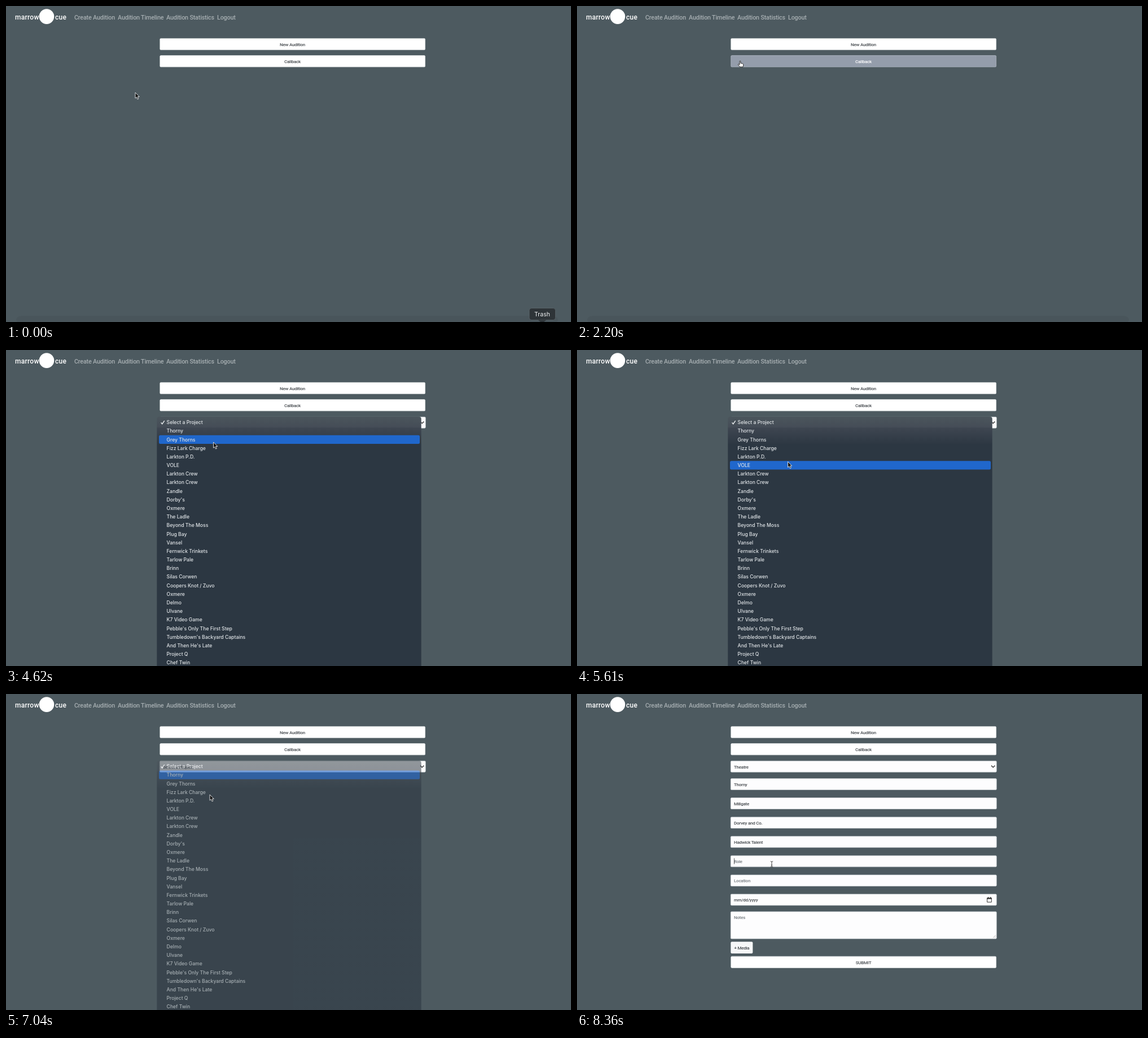
An HTML page for the animation above (8470 ms loop, 1001x559 px).

```html
<!DOCTYPE html>
<html lang="en">
<head>
<meta charset="utf-8">
<title>Create Audition</title>
<style>
  html, body { margin: 0; width: 100%; height: 100%; overflow: hidden; background: #4d5a60; }
  svg { display: block; width: 100%; height: 100%; }
  text { font: 500 8px Roboto, sans-serif; letter-spacing: -.25px; fill: #454a4e; }
  .mid { text-anchor: middle; }
  .hint { fill: #777d82; }
  .brand { font-size: 12px; letter-spacing: .3px; fill: #fff; }
  .nav { font-size: 10.8px; letter-spacing: -.2px; fill: #a6aeb1; }
  .item { font: 500 8.6px Inter, sans-serif; letter-spacing: 0; fill: #e2e6e9; }
  .tip { font: 400 10.5px Inter, sans-serif; letter-spacing: 0; fill: #f0f2f3; }
  .field { fill: #fdfdfe; stroke: #c3cacf; stroke-width: .7; }
</style>
</head>
<body>
<svg id="stage" viewBox="0 0 1001 559" preserveAspectRatio="none">
  <defs>
    <linearGradient id="shade" gradientUnits="userSpaceOnUse" x1="0" y1="118" x2="0" y2="168">
      <stop offset="0" stop-color="#4b555c"/>
      <stop offset=".36" stop-color="#454d57"/>
      <stop offset=".4" stop-color="#3e4651"/>
      <stop offset="1" stop-color="#2c3742"/>
    </linearGradient>
  </defs>
</svg>
<script>
const LOOP = 8470, STEP = 110;
const ROW = 15.18, MENU_TOP = 120.4;
const projects = [
  "Select a Project", "Thorny", "Grey Thorns", "Fizz Lark Charge", "Larkton P.D.", "VOLE",
  "Larkton Crew", "Larkton Crew", "Zandle", "Dorby's", "Oxmere", "The Ladle",
  "Beyond The Moss", "Plug Bay", "Vansel", "Fernwick Trinkets", "Tarlow Pale", "Brinn",
  "Silas Corwen", "Coopers Knot / Zuvo", "Oxmere", "Delmo", "Ulvane", "K7 Video Game",
  "Pebble's Only The First Step", "Tumbledown's Backyard Captains", "And Then He's Late",
  "Project Q", "Chef Twin"
];

// Pointer path: time, x, y
const path = [
  [0, 229, 153], [220, 229, 153], [880, 286, 93], [1760, 287, 96], [2200, 289, 97],
  [2640, 289, 97], [3300, 338.5, 125.5], [4070, 338.5, 125.5], [4620, 367.5, 163],
  [5060, 371, 184], [5610, 373.5, 197.5], [5940, 373.5, 197.5], [6600, 364, 145],
  [6820, 363, 146], [7040, 361, 178], [7700, 345, 301], [LOOP, 345, 301]
];

const text = (x, y, str, cls = "") => `<text x="${x}" y="${y}" class="${cls}">${str}</text>`;
const rect = (x, y, w, h, r, attrs) =>
  `<rect x="${x}" y="${y}" width="${w}" height="${h}" rx="${r}" ${attrs}/>`;
const group = (id, body) => `<g id="${id}">${body}</g>`;
const field = (y, h, str, cls) =>
  rect(272.3, y, 471, h, 1.6, 'class="field"') + text(278, y + 13.1, str, cls);
const button = (y, str, id) =>
  rect(272.8, y, 469.8, 20.2, 1.6, `id="${id}" fill="#fff" stroke="#e4e7e9" stroke-width=".7"`) +
  text(507.5, y + 13.5, str, `mid ${id}Text`);
const select = str =>
  field(118.4, 19.8, str) +
  '<path d="M734 126.6l3.2 3.2 3.2-3.2" fill="none" stroke="#444" stroke-width="1.5"/>';

const page =
  rect(18, 548, 960, 14, 10, 'id="dock" fill="#000" opacity=".05"') +
  text(16, 24, "marrow", "brand") + '<circle cx="72" cy="18.6" r="13.3" fill="#fff"/>' +
  text(87, 24, "cue", "brand") +
  text(121, 24, "Create Audition", "nav") + text(198, 24, "Audition Timeline", "nav") +
  text(284, 24, "Audition Statistics", "nav") + text(374, 24, "Logout", "nav") +
  button(57.4, "New Audition", "fresh") + button(87.6, "Callback", "callback");

const trash =
  rect(927, 534.5, 46.5, 21, 4, 'fill="#2e3438" stroke="#5d686d" stroke-width=".8"') +
  '<path d="M943 555.4h14l-4 3.6h-6z" fill="#2e3438"/>' + text(950, 549, "Trash", "tip mid");

const form =
  select("Theatre") +
  [["Thorny", 149.6], ["Millgate", 183.6], ["Dorvey and Co.", 217.7], ["Hadwick Talent", 251.7]]
    .map(([str, y]) => field(y, 19.9, str)).join("") +
  field(285.9, 19.9, "Role", "hint") + field(320, 19.9, "Location", "hint") +
  field(354, 19.9, "mm/dd/yyyy") +
  '<path d="M726.7 361.2h7.6v7h-7.6z" fill="none" stroke="#333" stroke-width="1"/>' +
  '<path d="M726.2 360.4h8.6v2.4h-8.6zM728 359h1.2v2h-1.2zM732 359h1.2v2h-1.2z" fill="#333"/>' +
  field(385, 48, "Notes", "hint") +
  '<path d="M737 431.5l5-5M740 431.5l2-2" stroke="#999" stroke-width=".7"/>' +
  rect(272.4, 438.2, 39, 20.8, 2, 'fill="#f6f7f8"') + text(292, 451.7, "+ Media", "mid") +
  button(464.2, "SUBMIT", "submit") +
  '<path id="caret" d="M278.6 290.5v10.5" stroke="#333" stroke-width=".8"/>';

const menu =
  rect(267.3, 118, 468.4, 450, 4, 'fill="url(#shade)"') +
  rect(271, 0, 462, ROW, 2.5, 'id="bar"') +
  '<path d="M274.6 128.4l2.1 2.4 4-5.6" fill="none" stroke="#f0f2f4" stroke-width="1.4"/>' +
  projects.map((name, i) => text(284.6, 131.2 + i * ROW, name, "item")).join("");

const pointers =
  group("arrow", '<path d="M0 0V10.2L2.3 8.2 4 12 5.8 11.2 4.2 7.5H7.3Z" fill="#151515" stroke="#e8eaec" stroke-width=".9"/>') +
  group("hand", '<path d="M-.9 .7Q0-.5 .9 .7V4.1L4.4 4.9Q6 5.4 5.8 7.2L5 10.8H-.2L-3.6 6.7Q-3.4 5.1-1.9 6L-.9 7Z" fill="#fff" stroke="#222" stroke-width=".9"/>') +
  group("beam", '<path id="stem" d="M-2.2-5Q0-5 0-3.6Q0-5 2.2-5M0-3.6V3.8M-2.2 5Q0 5 0 3.8Q0 5 2.2 5M-1.2 1.8H1.2" fill="none" stroke="#444" stroke-width="1"/>');

const stage = document.getElementById("stage");
stage.insertAdjacentHTML("beforeend",
  page + group("trash", trash) + group("picker", select("Select a Project")) +
  group("form", form) + group("menu", menu) + group("pointer", pointers));

const $ = id => document.getElementById(id);
const show = (id, on) => $(id).setAttribute("display", on ? "inline" : "none");
const ramp = (t, a, b) => Math.min(1, Math.max(0, (t - a) / (b - a)));
const mix = (a, b, k) => a + (b - a) * k;
const blend = (a, b, k) => `rgb(${a.map((v, i) => Math.round(mix(v, b[i], k)))})`;

function locate(t) {
  const i = path.findIndex(p => p[0] > t);
  const [t0, x0, y0] = path[i - 1], [t1, x1, y1] = path[i];
  const u = ramp(t, t0, t1), k = u * u * (3 - 2 * u);
  return [mix(x0, x1, k), mix(y0, y1, k)];
}

function draw(t) {
  const [x, y] = locate(t);

  $("trash").setAttribute("opacity", 1 - ramp(t, 110, 330));
  show("dock", t < 3300);

  const hover = ramp(t, 860, 1020) * (1 - ramp(t, 2840, 3000));
  $("callback").setAttribute("fill", blend([255, 255, 255], [148, 157, 171], hover));
  $("callback").setAttribute("stroke", blend([228, 231, 233], [181, 188, 198], hover));
  document.querySelector(".callbackText").style.fill = blend([69, 74, 78], [255, 255, 255], hover);

  const filled = t >= 7370;
  show("picker", t >= 2640 && !filled);
  show("form", filled);
  show("caret", t >= 8140);

  show("menu", t >= 3410 && t < 7190);
  $("menu").setAttribute("opacity", 1 - ramp(t, 6945, 7185));
  const row = t > 6820 ? 1 : Math.max(0, Math.floor((y - MENU_TOP) / ROW));
  $("bar").setAttribute("y", MENU_TOP + row * ROW);
  $("bar").setAttribute("fill", row ? "#2067cc" : "#2f7ce0");

  const hand = t >= 800 && t < 2860, beam = t >= 7480;
  show("hand", hand);
  show("beam", beam);
  show("arrow", !hand && !beam);
  $("pointer").setAttribute("transform", `translate(${x} ${y})`);
}

function tick() {
  const t = performance.now() % LOOP;
  draw(Math.floor(t / STEP) * STEP);
  requestAnimationFrame(tick);
}
tick();
</script>
</body>
</html>
```
